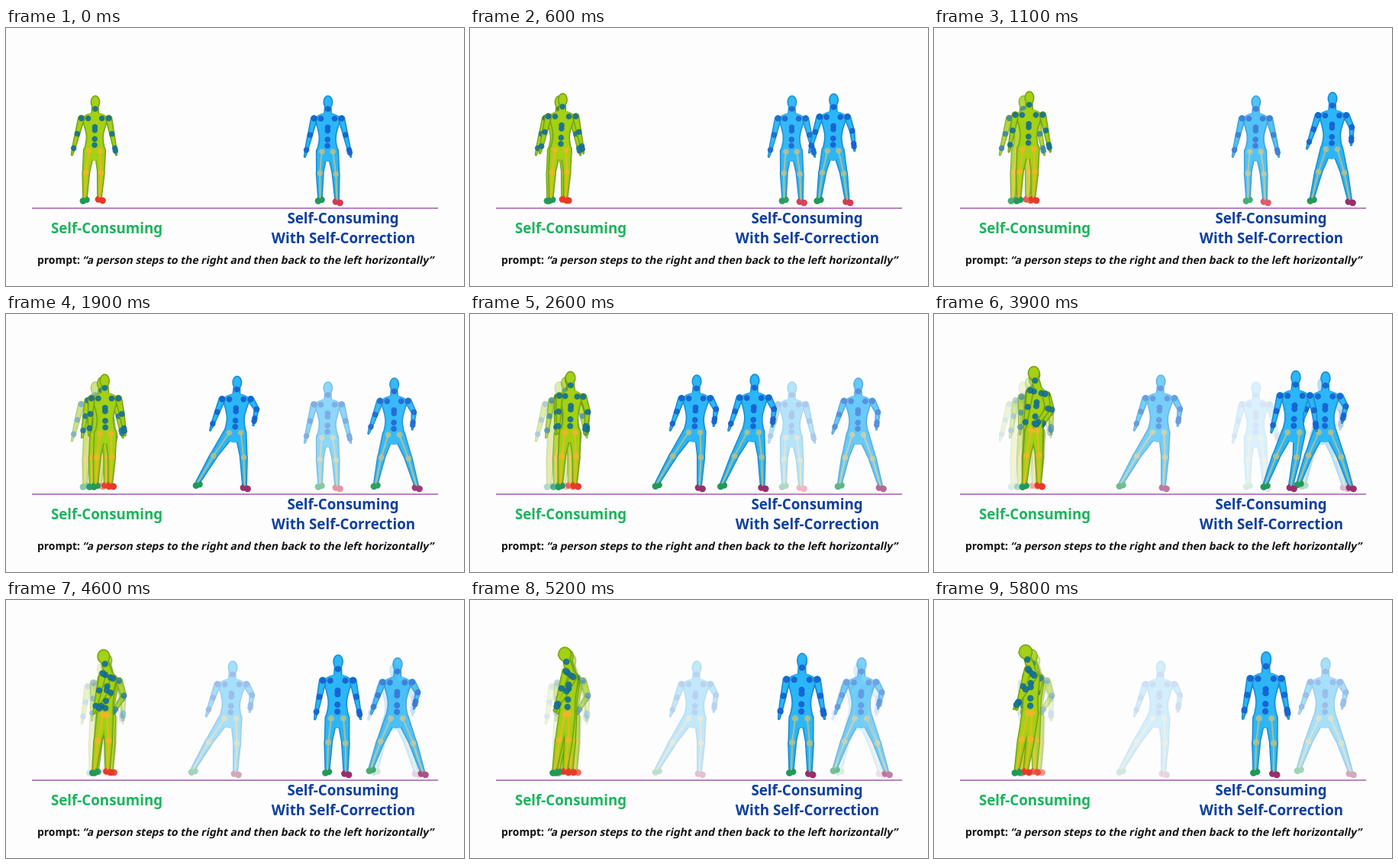
Write an HTML page with a canvas that moves like this. It is 600 px wide and 338 px high and loops after 5.9 s.

```html
<!DOCTYPE html>
<html lang="en">
<head>
<meta charset="utf-8">
<title>Self-Consuming motion comparison</title>
<style>
  html, body { margin: 0; width: 100%; height: 100%; overflow: hidden; background: #fdfdfd; }
  canvas, svg { position: absolute; left: 0; top: 0; width: 600px; height: 338px; }
  text { font-family: "Noto Sans", "Open Sans", sans-serif; font-weight: 700; }
  .title { font-size: 18.75px; text-anchor: middle; }
  .prompt { font-size: 13.95px; fill: #111; }
</style>
</head>
<body>
<canvas id="stage"></canvas>
<svg viewBox="0 0 600 338">
  <text class="title" x="132" y="269" fill="#1cb45c">Self-Consuming</text>
  <text class="title" x="441.5" y="256" fill="#0d3f9f">Self-Consuming</text>
  <text class="title" x="442" y="282" fill="#0d3f9f">With Self-Correction</text>
  <text class="prompt" x="41" y="309">prompt:</text>
  <text class="prompt" transform="translate(100 309) skewX(-12)">“a person steps to the right and then back to the left horizontally”</text>
</svg>
<script>
const W = 600, H = 338, LOOP = 5900, STEP = 100, TAU = Math.PI * 2;
const TRACES = [0, 1.2, 2.3, 3.5, 4.7];
const scale = Math.max(2, window.devicePixelRatio || 1);

function makeLayer(el) {
  el.width = W * scale;
  el.height = H * scale;
  const c = el.getContext('2d');
  c.scale(scale, scale);
  c.lineCap = c.lineJoin = 'round';
  return c;
}
const stage = makeLayer(document.getElementById('stage'));
const layer = makeLayer(document.createElement('canvas'));

const mix = (a, b, k) => a + (b - a) * k;
const clamp = (v) => Math.max(0, Math.min(1, v));
const ease = (v) => clamp(v) ** 2 * (3 - 2 * clamp(v));
const between = (a, b, k) => [mix(a[0], b[0], k), mix(a[1], b[1], k)];

// Steps of the walker: time, hip x, half stride, shift of both feet
const STRIDES = [
  [0, 421, 11.5, 1.5], [1.1, 521, 25, -1], [1.2, 508, 27, 3], [1.9, 300, 31, -18],
  [2.3, 294, 28, -21], [3.2, 524, 24, 1], [3.5, 512, 34, 0], [3.9, 471, 17, -20], [4.6, 434, 12.5, -1]
];

function strideAt(t) {
  const next = STRIDES.findIndex((row) => row[0] > t);
  if (next < 0) return STRIDES[STRIDES.length - 1];
  const a = STRIDES[next - 1], b = STRIDES[next];
  return a.map((v, i) => mix(v, b[i], (t - a[0]) / (b[0] - a[0])));
}

const walker = {
  body: '#20a9ef', edge: '#1786c6', shine: '#2bb6f8', dot: '#1668dc', dotEdge: '#1253bb',
  bone: '#b9bf86', toe: (t) => t < 1 ? '#d23c50' : '#96306a',
  pose(t) {
    const [, x, spread, shift] = strideAt(t);
    const head = [x + 1 - shift * 0.1, 97 - 20 * (t / 5.8) ** 0.9];
    const pelvis = [x, 161 - 7 * ease(t / 2.3)];
    const chest = between(head, pelvis, 0.34);
    const lift = clamp((spread - 12) / 18), wide = 18 + t * 0.4;
    return {
      head, pelvis, chest, wide, turn: 0,
      wrists: [
        [chest[0] - 28 - 3 * lift, chest[1] + 41 - 9 * lift],
        [chest[0] + 28 - 4 * lift, chest[1] + 41 - 16 * lift]
      ],
      bends: [0, 5 * lift],
      feet: [[x + shift - spread, 226 - Math.max(0, spread - 25) * 0.3], [x + shift + spread, 228.5]]
    };
  }
};

const drifter = {
  body: '#94c512', edge: '#6c9a17', shine: '#a4d114', dot: '#17789a', dotEdge: '#106282',
  bone: '#f5b428', toe: () => '#e63a28',
  pose(t) {
    const turn = ease((t - 1.5) / 4.3), late = ease((t - 4) / 1.8);
    const x = 116 + 15 * ease(t / 2.2) - 5 * late;
    const head = [117 + 15 * Math.sin(Math.PI * t / 6.2), 97 - 5 * t];
    const pelvis = [x, 160 - 2.24 * t];
    const chest = between(head, pelvis, 0.34);
    chest[0] += 5 * ease(turn * 2);
    const reach = chest[1] + 39;
    return {
      head, pelvis, chest, turn, wide: 18 - 14 * turn,
      wrists: [[chest[0] + mix(-28, -16, ease(t / 3.2)), reach], [chest[0] + mix(26, -17, turn), reach]],
      bends: [0, 9 * Math.sin(Math.PI * turn)],
      feet: [[x - 13 - 5 * late, 226], [x + 7 - 12 * late, 225.5]]
    };
  }
};

function poseAt(fig, t) {
  const p = fig.pose(t);
  p.s = 0.5 + (p.pelvis[1] - p.head[1]) / 128;
  p.sides = [-1, 1].map((side, i) => {
    const shoulder = [p.chest[0] + side * p.wide, p.chest[1] + side * p.turn * 4];
    const wrist = p.wrists[i], foot = p.feet[i];
    const joint = between(shoulder, wrist, 0.52);
    joint[0] += p.bends[i];
    const d = Math.hypot(wrist[0] - joint[0], wrist[1] - joint[1]) || 1;
    const hand = between(joint, wrist, 1 + 9 * p.s / d);
    const hip = [p.pelvis[0] + side * Math.max(2.5, p.wide * 0.4), p.pelvis[1] + 1];
    const ankle = [foot[0] - side * 0.5, foot[1] - 4];
    const knee = between(hip, ankle, 0.47);
    knee[0] += side * 1.5;
    return { shoulder, joint, wrist, hand, hip, knee, ankle, foot };
  });
  return p;
}

function disc(c, p, r, ry = r) {
  c.beginPath();
  c.ellipse(p[0], p[1], Math.max(0.2, r), Math.max(0.2, ry), 0, 0, TAU);
  c.fill();
}

function limb(c, a, b, ra, rb) {
  const n = Math.atan2(b[1] - a[1], b[0] - a[0]) + Math.PI / 2;
  c.beginPath();
  c.arc(a[0], a[1], Math.max(0.2, ra), n, n + Math.PI);
  c.arc(b[0], b[1], Math.max(0.2, rb), n + Math.PI, n + TAU);
  c.closePath();
  c.fill();
}

function torso(c, p, inset) {
  const { chest, pelvis, wide, s } = p, span = pelvis[1] - chest[1];
  const rows = [
    [-8 * s, 4], [-5 * s, wide * 0.7], [0, Math.max(wide, 12)], [span * 0.3, Math.max(wide * 0.76, 12)],
    [span * 0.62, Math.max(wide * 0.6, 10)], [span, Math.max(wide * 0.8, 11)],
    [span + 10, Math.max(wide * 0.74, 9)], [span + 14, 3]
  ];
  const edge = (side) => rows.map(([y, w]) =>
    [mix(chest[0], pelvis[0], clamp(y / span)) + side * (w - inset), chest[1] + y]);
  const pts = [...edge(1), ...edge(-1).reverse()];
  const last = between(pts[pts.length - 1], pts[0], 0.5);
  c.beginPath();
  c.moveTo(last[0], last[1]);
  pts.forEach((q, i) => {
    const m = between(q, pts[(i + 1) % pts.length], 0.5);
    c.quadraticCurveTo(q[0], q[1], m[0], m[1]);
  });
  c.fill();
}

function trunk(c, p, inset) {
  const s = p.s;
  for (const q of p.sides) {
    limb(c, q.hip, q.knee, 8 * s - inset, 5.2 * s - inset);
    limb(c, q.knee, q.ankle, 5.5 * s - inset, 3.4 * s - inset);
  }
  torso(c, p, inset);
  limb(c, p.head, [p.chest[0], p.chest[1] - 5], 4.5 * s - inset, 5.5 * s - inset);
  disc(c, p.head, (6.4 + p.turn * 1.8) * s - inset, 8.8 * s - inset);
  if (p.turn > 0.5) disc(c, [p.head[0] - 7 * p.turn, p.head[1] + 1], 2.8 - inset);
}

function arms(c, p, inset) {
  const s = p.s;
  for (const q of p.sides) {
    limb(c, q.shoulder, q.joint, 4.7 * s - inset, 3.7 * s - inset);
    limb(c, q.joint, q.wrist, 3.8 * s - inset, 2.7 * s - inset);
    limb(c, q.wrist, q.hand, 2.8 * s - inset, 1.6 * s - inset);
  }
}

function ball(c, fig, p, r) {
  c.fillStyle = fig.dotEdge;
  disc(c, p, r);
  c.fillStyle = fig.dot;
  disc(c, [p[0] - 0.4, p[1] - 0.5], r - 0.9);
}

function joints(c, fig, p) {
  const s = p.s, r = 3.8 * s;
  c.globalAlpha = 0.85;
  c.strokeStyle = c.fillStyle = fig.bone;
  c.lineWidth = 2.2;
  for (const q of p.sides) {
    c.beginPath();
    for (const j of [q.hip, q.knee, q.ankle]) c.lineTo(j[0], j[1]);
    c.stroke();
    disc(c, q.hip, r);
    disc(c, q.knee, r);
  }
  c.globalAlpha = 0.8;
  ball(c, fig, [mix(p.head[0], p.chest[0], 0.35), p.head[1] + 9 * s], r);
  for (const k of [0.27, 0.37, 0.65, 0.84]) ball(c, fig, between(p.chest, p.pelvis, k), r);
  p.sides.forEach((q, i) => {
    ball(c, fig, between(p.chest, q.shoulder, 0.5), r);
    for (const j of [q.shoulder, q.joint, q.wrist]) ball(c, fig, j, r);
    if (i) ball(c, fig, between(q.wrist, q.hand, 0.4), r);
  });
  c.globalAlpha = 1;
}

function feet(c, fig, p, t) {
  const [l, r] = p.feet;
  c.fillStyle = '#1f9a58';
  disc(c, [l[0] - 2, l[1] + 0.5], 4.4);
  disc(c, [l[0] + 2.5, l[1] - 1], 4.3);
  c.fillStyle = fig.toe(t);
  disc(c, [r[0] - 2, r[1] - 1], 4.4);
  disc(c, [r[0] + 3.5, r[1] + 0.5], 4.4);
}

function drawFigure(fig, t, alpha) {
  const p = poseAt(fig, t), c = layer;
  c.clearRect(0, 0, W, H);
  for (const part of [trunk, arms]) {
    [fig.edge, fig.body, fig.shine].forEach((color, i) => {
      c.fillStyle = color;
      part(c, p, i * 1.1);
    });
  }
  feet(c, fig, p, t);
  joints(c, fig, p);
  stage.globalAlpha = alpha;
  stage.drawImage(layer.canvas, 0, 0, W, H);
  stage.globalAlpha = 1;
}

function drawTrail(fig, t) {
  for (const start of TRACES) {
    const age = t - start;
    if (age > 0 && age < 4.3) drawFigure(fig, start, 1 / (1 + (age / 2) ** 2.5));
  }
  drawFigure(fig, t, 1);
}

function render(ms) {
  const t = Math.floor((ms % LOOP) / STEP) * STEP / 1000;
  stage.fillStyle = '#fdfdfd';
  stage.fillRect(0, 0, W, H);
  stage.fillStyle = '#b477bc';
  stage.fillRect(34, 235.2, 532, 1.8);
  drawTrail(drifter, t);
  drawTrail(walker, t);
}

const begin = performance.now();
function tick() {
  render(performance.now() - begin);
  requestAnimationFrame(tick);
}
tick();
</script>
</body>
</html>
```
